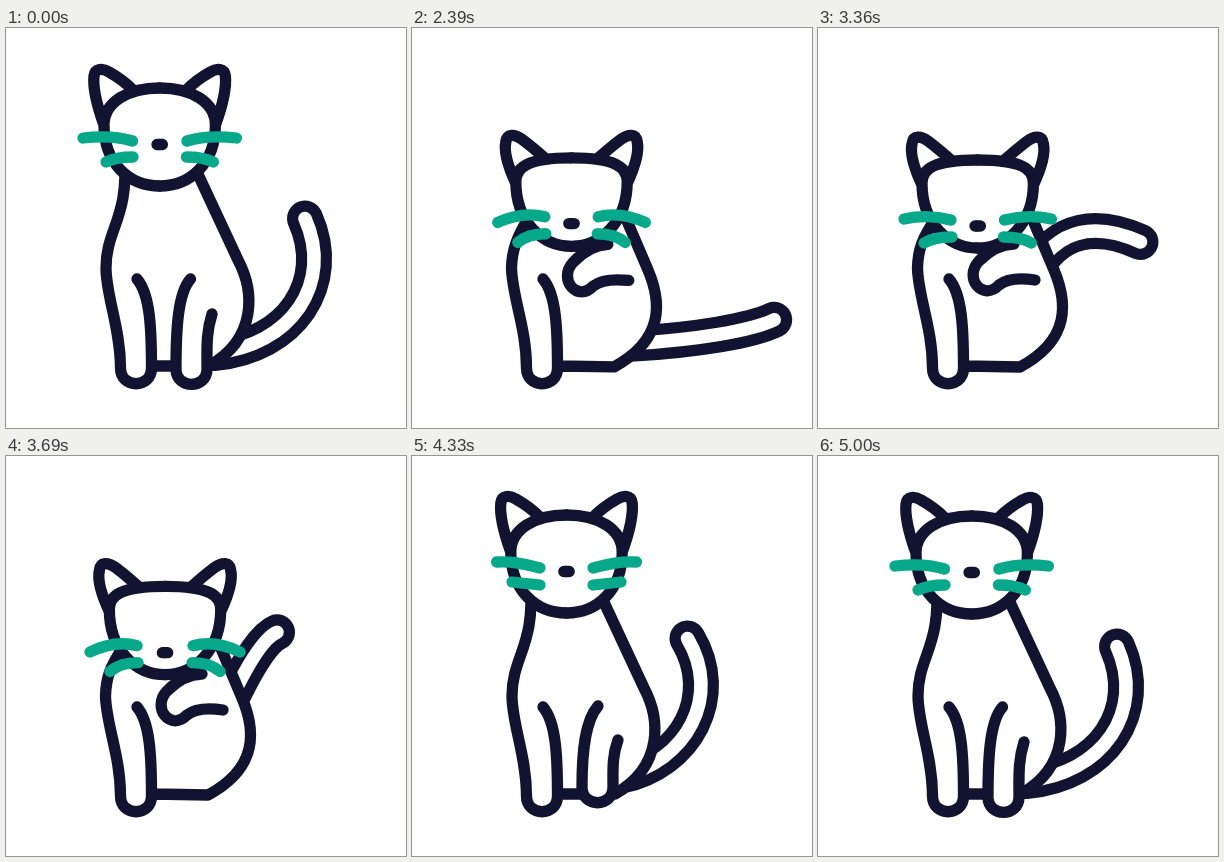
An HTML page that plays this animation: 400 px wide and 400 px high, repeating every 5060 ms.

```html
<!DOCTYPE html>
<html lang="en">
<head>
<meta charset="utf-8">
<title>Cat washing its paw</title>
<style>
  html, body { margin: 0; width: 100%; height: 100%; overflow: hidden; background: #fff; }
  svg { display: block; width: 100vw; height: 100vh; }
  path { fill: #fff; stroke: #121331; stroke-width: 11.3; stroke-linecap: round; stroke-linejoin: round; }
  .tail { fill: none; stroke-width: 36; }
  .tail.core { stroke: #fff; stroke-width: 13.6; }
  .whiskers { fill: none; stroke: #08a88a; }
</style>
</head>
<body>
<svg viewBox="0 0 400 400">
  <path class="tail"/><path class="tail core"/>
  <path class="body"/>
  <path class="paw"/>
  <path class="face"/><path class="face mirror"/>
  <path class="whiskers"/><path class="whiskers mirror"/>
</svg>
<script>
const LOOP = 5060, START = 2030, LAST = 5000, STEP = 1000 / 33;
const NUM = /-?\d+(\.\d+)?/g;

const shift = (d, dx, dy) => {
  let i = 0;
  return d.replace(NUM, n => +n + (i++ % 2 ? dy : dx));
};

// Left halves; the right halves are mirrored about the first x of the face.
const face = {
  sit: 'M153.7 60C122 60 98 74 98 97C98 135 123 158 153.7 158M98 97C90 75 87 58 88 48C89 40 97 40 103 44C112 49 120 55 127 62M151 116.5L153.7 116.5',
  lick: 'M159.7 132C115 132 104 141 104 155C104 195 130 220 159.7 220M104 157C96 140 92 125 94 116C95 107 103 108 110 113C118 119 125 125 133 132M157 198L159.7 198',
  rise: 'M159.2 136C112 136 103 144 103 156C104 195 132 216 159.2 216M103 158C94 142 89 128 91 121C93 113 98 114 104 117C114 123 122 129 130 136M156 197.5L159.2 197.5'
};
const whiskers = {
  sit: 'M77 110C95 108 110 108 126.5 113M100 134C108 130 117 129 127 129',
  droop: 'M86 197C101 190 118 187 133 191M106 217C115 209 125 208 134 208',
  flat: 'M86 191C100 188 118 188 133 192M106 215C114 210 125 209 134 209',
  rise: 'M84 195C98 190 116 187 132 191M104 218C113 209 124 208 132 208',
  lag: 'M84.5 106C100 105 112 108 128 112M100 126C108 127 118 128 128 129'
};
const leg = 'C100 268 114.5 300 114.5 340C114.5 361 145.5 361 145.5 340C145.5 300 144 266 ';
const body = {
  sit: `M118 125C124 190 100 200 100 240${leg}131 251M183 127L232 232C248 262 252 310 203 338L147 338`,
  lick: `M118 190C104 210 100 222 99.5 240${leg}131 251M214 190L236 242C250 275 252 312 202 339L147 338`,
  rise: `M116 190C104 210 98 226 98 245${leg}130 256M203 190L236 258C252 290 245 316 202 338L147 338`
};
const paw = {
  sit: 'M184.5 251C172 265 170 300 170 341C170 361.5 201 361.5 201 341C201 320 200 305 206 286',
  lift: 'M185 250C172 265 170 300 170 335C170 355.5 201 355.5 201 335C201 320 200 305 206 285',
  lick: 'M196 216C184 216 172 222 161 233C145 250 165 274 181 257C190 250 203 250 217 252',
  rise: 'M195 233C187 236 176 243 167 253C151 268 172 288 185 272C193 265 203 264 215 264',
  land: 'M186 250C173 265 170 295 170 331C170 352 201 352 201 331C201 315 200 300 206 284'
};
const restTail = 'M208 325C285 318 328 255 299 190.5';

const tracks = {
  tail: [
    [2000, restTail],
    [2030, 'M208 325C288 322 336 266 314 202'],
    [2300, 'M220 318C288 318 345 300 361 268'],
    [2540, 'M224 312C275 298 325 305 363 320'],
    [2840, 'M225 308C275 288 315 297 360.5 326'],
    [3110, 'M220 278C262 242 318 234 360 264'],
    [3360, 'M215 245C240 198 280 195 322.5 214'],
    [3660, 'M215 262C245 195 262 180 276 178'],
    [4000, 'M230 290C258 255 262 185 224 165'],
    [4330, 'M208 320C275 306 310 240 275.5 182.5'],
    [4740, 'M208 324C283 316 324 252 295 189'],
    [5000, restTail]
  ],
  body: [
    [2000, body.sit], [2450, body.lick], [3800, body.lick],
    [4000, body.rise], [4310, body.sit]
  ],
  paw: [
    [2000, paw.sit], [2030, paw.lift], [2420, paw.lick],
    [2600, shift(paw.lick, 0, 3)], [2840, paw.lick],
    [3100, shift(paw.lick, 0, 3)], [3360, paw.lick],
    [3620, shift(paw.lick, 0, 3)], [3800, paw.lick],
    [4000, paw.rise], [4330, paw.land], [4500, paw.sit]
  ],
  face: [
    [2000, face.sit], [2030, shift(face.sit, 0.3, 3.5)], [2440, face.lick],
    [2600, shift(face.lick, -1, -2)], [2840, face.lick],
    [3100, shift(face.lick, -1, -2)], [3360, face.lick],
    [3620, shift(face.lick, -1, -2)], [3800, face.lick],
    [4000, face.rise], [4330, shift(face.sit, 0.8, -1)],
    [4440, shift(face.sit, 0, -12)], [4740, shift(face.sit, 0, -3)], [4970, face.sit]
  ],
  whiskers: [
    [2000, whiskers.sit], [2030, shift(whiskers.sit, 0.5, 4)], [2440, whiskers.droop],
    [2600, shift(whiskers.flat, -3, -2)], [2840, whiskers.droop],
    [3100, shift(whiskers.droop, -3, -2)], [3360, whiskers.flat],
    [3620, shift(whiskers.droop, -3, -2)], [3800, whiskers.droop],
    [4000, whiskers.rise], [4330, whiskers.lag],
    [4440, shift(whiskers.sit, 3, -13)], [4740, shift(whiskers.sit, 0, -3)], [4970, whiskers.sit]
  ]
};

const parts = Object.entries(tracks).map(([name, keys]) => ({
  els: document.querySelectorAll('.' + name),
  shape: keys[0][1],
  times: keys.map(k => k[0]),
  poses: keys.map(k => k[1].match(NUM).map(Number))
}));

// Monotone cubic interpolation of every coordinate.
function sample({ times, poses }, t) {
  const last = times.length - 1;
  if (t <= times[0]) return poses[0];
  if (t >= times[last]) return poses[last];
  const k = times.findIndex(x => x > t) - 1;
  const h = times[k + 1] - times[k], u = (t - times[k]) / h;
  return poses[k].map((a, i) => {
    const rate = j => j < 0 || j >= last ? 0 : (poses[j + 1][i] - poses[j][i]) / (times[j + 1] - times[j]);
    const slope = j => {
      const p = rate(j - 1), q = rate(j);
      return p * q > 0 ? 2 * p * q / (p + q) : 0;
    };
    const ease = u * u * (3 - 2 * u);
    return a + (poses[k + 1][i] - a) * ease
      + h * u * (1 - u) * ((1 - u) * slope(k) - u * slope(k + 1));
  });
}

// 33 steps a second, each beginning on a whole hundredth of a second.
const hundredth = t => Math.floor(t / 10) * 10;
function stepTime(t) {
  if (t < START) return 0;
  const n = Math.ceil((hundredth(t) + 10) / STEP) - 1;
  return Math.min(hundredth(n * STEP), LAST);
}

function draw(now) {
  const t = stepTime(now % LOOP);
  let axis = 0;
  for (const part of parts) {
    const values = sample(part, t);
    let i = 0;
    const d = part.shape.replace(NUM, () => values[i++].toFixed(2));
    if (part.els[0].matches('.face')) axis = values[0];
    for (const el of part.els) {
      el.setAttribute('d', d);
      if (el.matches('.mirror')) el.setAttribute('transform', `matrix(-1 0 0 1 ${2 * axis} 0)`);
    }
  }
}

const begin = performance.now();
function tick() {
  draw(performance.now() - begin);
  requestAnimationFrame(tick);
}
tick();
</script>
</body>
</html>
```
